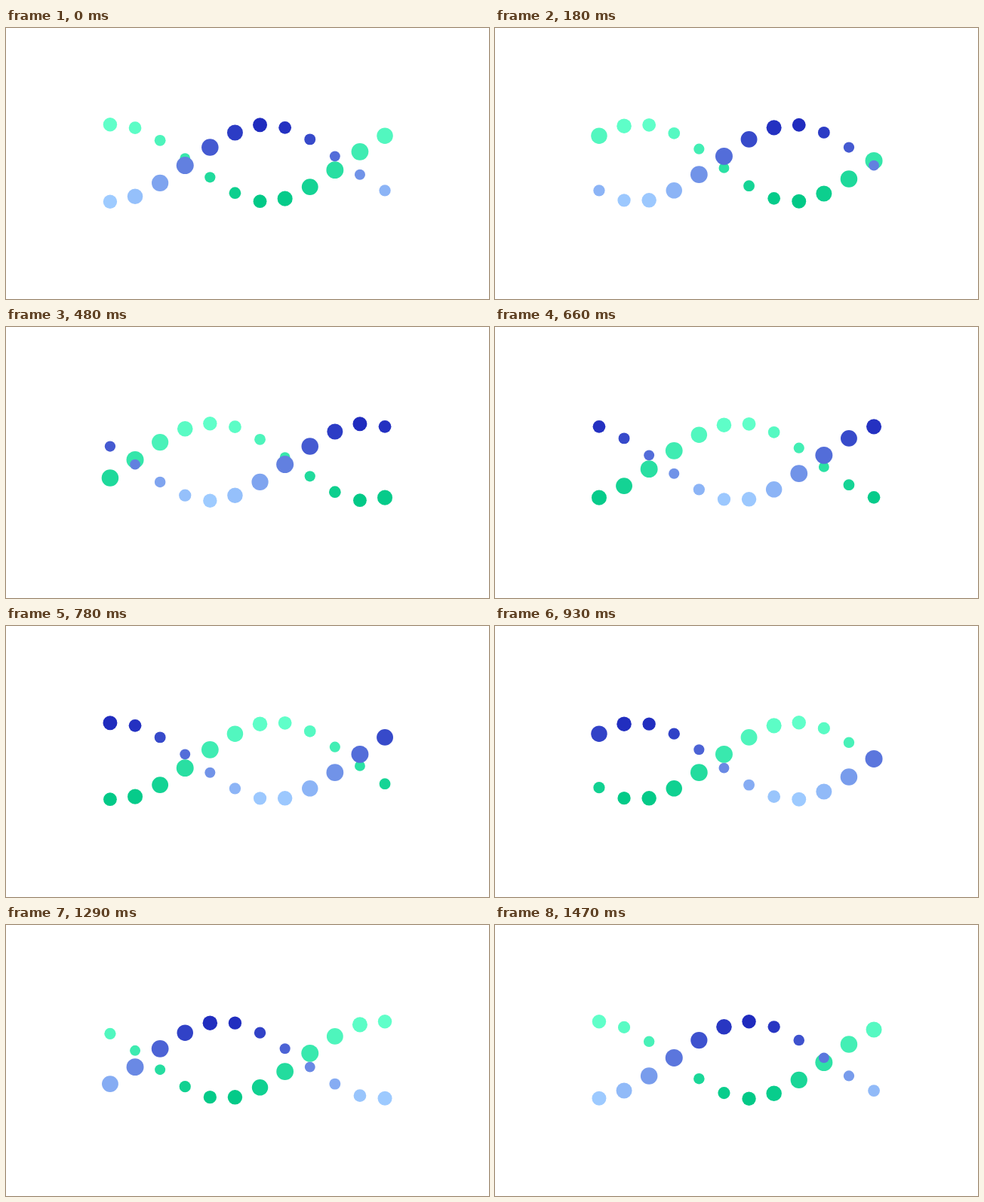
An HTML page with a canvas that plays this animation: 640 by 360 pixels, repeating every 1500 ms.

```html
<!DOCTYPE html>
<html lang="en">
<head>
<meta charset="utf-8">
<title>Double helix loader</title>
<style>
  html, body { margin: 0; width: 100%; height: 100%; overflow: hidden; background: #fff; }
  canvas { display: block; }
</style>
</head>
<body>
<canvas id="stage" width="640" height="360"></canvas>
<script>
const ctx = document.getElementById("stage").getContext("2d");

const LOOP = 1500, HALF = LOOP / 2, QUARTER = LOOP / 4, TICK = 30;
const COLUMNS = 12, LAG = 120;
const LEFT = 137.95, GAP = 33.1;
const TOP = 128.3, BOTTOM = 230.7;
const R_MIN = 6.9, R_MAX = 11.5;

// The rise of the green strand is one tick shorter and rests at the top.
const strands = [
  { shift: HALF, rise: HALF - TICK, low: [2, 201, 135], high: [96, 255, 201] },
  { shift: 0, rise: HALF, low: [158, 203, 255], high: [31, 43, 190] }
];

const mod = (a, n) => ((a % n) + n) % n;
const lerp = (a, b, k) => a + (b - a) * k;
const smooth = p => p * p * (3 - 2 * p);

// Eases 0 -> 1 in the first half of the loop and back in the second.
function swing(time) {
  const p = mod(time, LOOP) / HALF;
  return smooth(p < 1 ? p : 2 - p);
}

function drawDot(strand, column, time) {
  let phase = mod(time + strand.shift - LAG * column, LOOP);
  if (phase < HALF) phase = Math.min(HALF, phase * HALF / strand.rise);
  const height = swing(phase);
  const radius = lerp(R_MIN, R_MAX, swing(phase - QUARTER));
  const color = strand.low.map((c, i) => Math.round(lerp(c, strand.high[i], height)));

  ctx.fillStyle = `rgb(${color})`;
  ctx.beginPath();
  ctx.arc(LEFT + GAP * column, lerp(BOTTOM, TOP, height), radius, 0, Math.PI * 2);
  ctx.fill();
}

function draw(time) {
  ctx.fillStyle = "#fff";
  ctx.fillRect(0, 0, 640, 360);
  for (const strand of strands)
    for (let column = 0; column < COLUMNS; column++) drawDot(strand, column, time);
}

function frame() {
  draw(Math.floor(performance.now() / TICK) * TICK % LOOP);
  requestAnimationFrame(frame);
}
frame();
</script>
</body>
</html>
```
